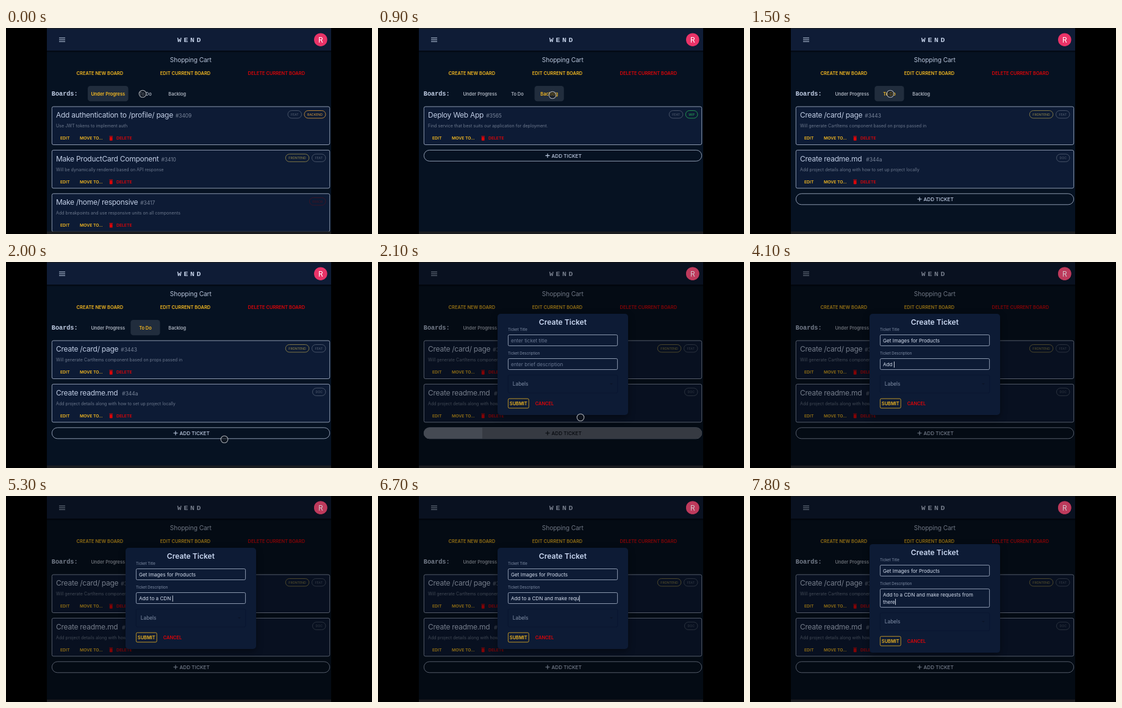
An HTML page that plays this animation: 600x338 px, repeating every 8 s.

```html
<!DOCTYPE html>
<html lang="en">
<head>
<meta charset="utf-8">
<title>Ticket board</title>
<style>
html, body { margin: 0; width: 100%; height: 100%; overflow: hidden; background: #000; }
svg { display: block; width: 600px; height: 338px; }
text { font-family: Inter, "Open Sans", sans-serif; white-space: pre; }
.mono { font-family: "Liberation Mono", monospace; font-weight: 700; }
#panel { filter: drop-shadow(0 4px 6px rgba(0, 0, 0, .4)); }
</style>
</head>
<body>
<svg id="stage" viewBox="0 0 600 338"></svg>
<script>
const YELLOW = '#f5b921', RED = '#dc0508', PALE = '#c0cde4', EDGE = '#9ba8be', CARD = '#0d1b35', PAGE = '#061222';
const GREY = '#566174', GOLD = '#988b4b', AMBER = '#dc9c3c', GREEN = '#27b257', WINE = '#461322';
const LOOP = 8000;

const rect = (x, y, w, h, r, fill, stroke = 'none', extra = '') =>
  `<rect x="${x}" y="${y}" width="${w}" height="${h}" rx="${r}" fill="${fill}" stroke="${stroke}" ${extra}/>`;
const text = (x, y, size, fill, str, extra = '') =>
  `<text x="${x}" y="${y}" font-size="${size}" fill="${fill}" ${extra}>${str}</text>`;
const line = (d, color, width = 1, extra = '') =>
  `<path d="${d}" fill="none" stroke="${color}" stroke-width="${width}" ${extra}/>`;
const MID = 'text-anchor="middle"', MEDIUM = 'font-weight="500"', SEMI = 'font-weight="600"';
const TIGHT = 'letter-spacing="-.022em"', THIN = 'stroke-width=".9"';

const badge = (y, [label, x, w, color]) =>
  rect(x, y + 6.5, w, 12.5, 6.25, 'none', color, 'stroke-width=".8"') +
  text(x + w / 2, y + 14.7, 5.2, color, label, MID);

const card = ([title, id, desc, ...badges], i) => {
  const y = 129 + i * 71.4;
  return rect(75.3, y, 455.4, 62.5, 2.5, CARD, EDGE, THIN) +
    text(82, y + 18.3, 12, PALE, `${title}<tspan dx="4" font-size="8.4" fill="#7b879c" letter-spacing="0">${id}</tspan>`, TIGHT) +
    text(82, y + 34.3, 7.1, '#6c788d', desc) +
    text(89, y + 54.3, 6.8, YELLOW, 'EDIT', SEMI) +
    text(121, y + 54.3, 6.8, YELLOW, 'MOVE TO...', SEMI) +
    rect(169.3, y + 48.2, 5.8, 1, 0, RED) + rect(169.8, y + 49.8, 4.8, 6, .7, RED) +
    text(181, y + 54.3, 6.8, RED, 'DELETE', SEMI) +
    badges.map(b => badge(y, b)).join('');
};

const addButton = (y, color = PALE) =>
  line(`M274.5 ${y + 9}h7M278 ${y + 5.5}v7`, color, 1.1) +
  text(284.5, y + 12.1, 8.2, color, 'ADD TICKET', MEDIUM);

const avatar = (fill, ink) =>
  `<circle cx="515.8" cy="19.2" r="10.8" fill="${fill}"/>` + text(515.8, 23.5, 12, ink, 'R', MID);

const boards = [
  { name: 'Under Progress', x: 134, w: 66.5, cards: [
    ['Add authentication to /profile/ page', '#3409', 'Use JWT tokens to implement auth', ['FEAT', 462, 22.5, GREY], ['BACKEND', 489, 35, AMBER]],
    ['Make ProductCard Component', '#3410', 'Will be dynamically rendered based on API response', ['FRONTEND', 458.3, 38.5, GOLD], ['FEAT', 501.5, 22.5, GREY]],
    ['Make /home/ responsive', '#3417', 'Add breakpoints and use responsive units on all components', ['ERROR', 497.5, 26.5, WINE]]] },
  { name: 'To Do', x: 204.3, w: 48.2, cards: [
    ['Create /card/ page', '#3443', 'Will generate CartItems component based on props passed in', ['FRONTEND', 458.3, 38.5, GOLD], ['FEAT', 501.5, 22.5, GREY]],
    ['Create readme.md\u00a0', '#344a', 'Add project details along with how to set up project locally', ['DOC', 502.5, 21.5, GREY]]] },
  { name: 'Backlog', x: 256.6, w: 48.2, cards: [
    ['Deploy Web App', '#3565', 'Find service that best suits our application for deployment.', ['FEAT', 477.3, 22.5, GREY], ['WIP', 504.3, 19.7, GREEN]]] }
];

const tab = (b, active) =>
  (active ? rect(b.x, 95, b.w, 25.2, 4.5, '#212d3d') : '') +
  text(b.x + b.w / 2, 110.5, 7.4, active ? YELLOW : '#aab1bd', b.name, MID + ' ' + SEMI);

const boardView = (b, i) => {
  const end = 129 + b.cards.length * 71.4;
  return `<g id="board${i}">` + boards.map(o => tab(o, o === b)).join('') + b.cards.map(card).join('') +
    rect(75.3, end, 455.4, 18, 9, PAGE, EDGE, THIN) + addButton(end) + '</g>';
};

const page =
  rect(67, 0, 466, 338, 0, PAGE) +
  rect(67, 37, 466, 2.5, 0, '#030a15') + rect(67, 0, 466, 37, 0, '#0f1c36') + rect(67, 0, 466, 1.2, 0, '#1b1f27') +
  line('M87 16.2h10M87 19.2h10M87 22.2h10', PALE, 1.1) +
  text(302, 23, 11.5, PALE, 'WEND', `class="mono" letter-spacing="3.7" ${MID}`) +
  avatar('#ea3368', '#fff') +
  text(302.8, 55.6, 10.2, '#b7c3d8', 'Shopping Cart', `${MID} letter-spacing="-.01em"`) +
  text(153.8, 77, 7.45, YELLOW, 'CREATE NEW BOARD', MID + ' ' + SEMI) +
  text(294, 77, 7.45, YELLOW, 'EDIT CURRENT BOARD', MID + ' ' + SEMI) +
  text(443.3, 77, 7.45, RED, 'DELETE CURRENT BOARD', MID + ' ' + SEMI) +
  text(74.8, 111, 10.2, PALE, 'Boards:', 'class="mono"') +
  boards.map(boardView).join('') +
  rect(67, 333.8, 466, 4.2, 0, '#1a1c20');

const field = (y, id) =>
  rect(213.4, y, 179.2, 18, 2, CARD, EDGE, `${THIN} id="${id}Box"`) +
  text(218, y + 12.2, 8.15, '#d5deee', '', `id="${id}"`) +
  text(218, y + 24.6, 8.15, '#d5deee', '', `id="${id}2"`);

const modal = '<g id="modal">' + rect(67, 0, 466, 334, 0, '#000', 'none', 'opacity=".4"') +
  avatar('#bd3a5c', '#d3c3cb') +
  '<g id="press">' + rect(75, 271.8, 456, 18, 9, '#363a42') +
  '<path d="M84 271.8H171V289.8H84a9 9 0 0 1 0-18" fill="#454a53"/>' + addButton(271.8, '#05080d') + '</g>' +
  rect(196, 85, 214, 166, 5, CARD, 'none', 'id="panel"') +
  '<g id="upper">' +
  text(302.9, 103.2, 12.1, '#c8d6f0', 'Create Ticket', MID + ' ' + SEMI) +
  text(213, 113.2, 6.1, '#8290a8', 'Ticket Title') + field(119.5, 'title') +
  text(213, 152.3, 6.1, '#8290a8', 'Ticket Description') + field(158.5, 'desc') +
  '</g><g id="lower">' +
  rect(213.4, 185.5, 179.2, 29.5, 2, 'none', '#0a1630', THIN) +
  text(220.8, 203.2, 8.3, '#8290a8', 'Labels') + '<path d="M380 199h5l-2.5 2.5z" fill="#0a1428"/>' +
  rect(213.4, 224.2, 33.8, 15.6, 2, 'none', '#cfa028', THIN) +
  text(230.3, 234.8, 7.4, YELLOW, 'SUBMIT', MID + ' ' + SEMI) +
  text(273, 234.8, 7.4, RED, 'CANCEL', MID + ' ' + SEMI) +
  '</g>' + line('M0 0v10', '#e4eaf4', .9, 'id="caret"') + '</g>';

const stage = document.getElementById('stage');
stage.innerHTML = page + modal +
  '<circle id="pointer" r="5.8" fill="#14181f" fill-opacity=".55" stroke="#a9adb3" stroke-width="1.1"/>';

const $ = id => document.getElementById(id);
const show = (id, on) => $(id).setAttribute('display', on ? 'inline' : 'none');
const clamp = v => Math.max(0, Math.min(1, v));

const TITLE = 'Get Images for Products', DESC = 'Add to a CDN and make requests from there';
const PAUSE = 13, BREAK = 36;

// time, x, y
const path = [[0, 224, 108], [300, 226, 108], [700, 286, 110], [1000, 286, 110], [1350, 230, 108], [1600, 230, 108],
  [2000, 358, 291], [2100, 332, 255], [2400, 262, 130], [2800, 262, 130], [3000, 246, 165], [LOOP, 246, 165]];

function pointerAt(t) {
  const i = path.findIndex(p => p[0] > t);
  const [a, b] = [path[i - 1], path[i]];
  const u = (t - a[0]) / (b[0] - a[0]), e = u * u * (3 - 2 * u);
  return [a[1] + (b[1] - a[1]) * e, a[2] + (b[2] - a[2]) * e];
}

function fill(id, str, hint) {
  $(id).textContent = str || hint;
  $(id).setAttribute('fill', str ? '#d5deee' : '#6b7993');
}

function draw(t) {
  const board = t < 300 ? 0 : t < 700 ? 1 : t < 1500 ? 2 : 1;
  boards.forEach((b, i) => show('board' + i, i === board));

  const [x, y] = pointerAt(t);
  $('pointer').setAttribute('transform', `translate(${x} ${y})`);
  show('pointer', t < 2500 || (t >= 2800 && t < 3400));

  show('modal', t >= 2100);
  if (t < 2100) return;
  $('press').setAttribute('opacity', 1 - clamp((t - 2200) / 300));

  const title = TITLE.slice(0, Math.floor(clamp((t - 2400) / 450) * TITLE.length));
  const count = t < 5800
    ? Math.floor(clamp((t - 3500) / 1780) * PAUSE)
    : PAUSE + Math.floor(clamp((t - 5750) / 2000) * (DESC.length - PAUSE));
  const wrapped = count > BREAK + 1;
  const grow = wrapped ? 6.1 : 0;
  const typed = DESC.slice(0, count);

  fill('title', title, 'enter ticket title');
  fill('desc', wrapped ? typed.slice(0, BREAK) : typed, 'enter brief description');
  $('desc2').textContent = wrapped ? typed.slice(BREAK) : '';

  $('panel').setAttribute('y', 85 - grow);
  $('panel').setAttribute('height', 166 + 2 * grow);
  $('descBox').setAttribute('height', 18 + 2 * grow);
  $('upper').setAttribute('transform', `translate(0 ${-grow})`);
  $('lower').setAttribute('transform', `translate(0 ${grow})`);

  const inTitle = t < 2900;
  const live = inTitle ? title && 'title' : wrapped ? 'desc2' : 'desc';
  const width = live && (inTitle || count) ? $(live).getComputedTextLength() : 0;
  const base = inTitle ? 126.5 : wrapped ? 172.9 : 167.5;
  $('caret').setAttribute('transform', `translate(${218.6 + width} ${base - 4.2})`);
  show('caret', t >= 2400 && (inTitle || t >= 3400) && !(t >= 5500 && t < 5800));
}

function tick(now) {
  draw(now % LOOP);
  requestAnimationFrame(tick);
}
draw(0);
requestAnimationFrame(tick);
</script>
</body>
</html>
```
